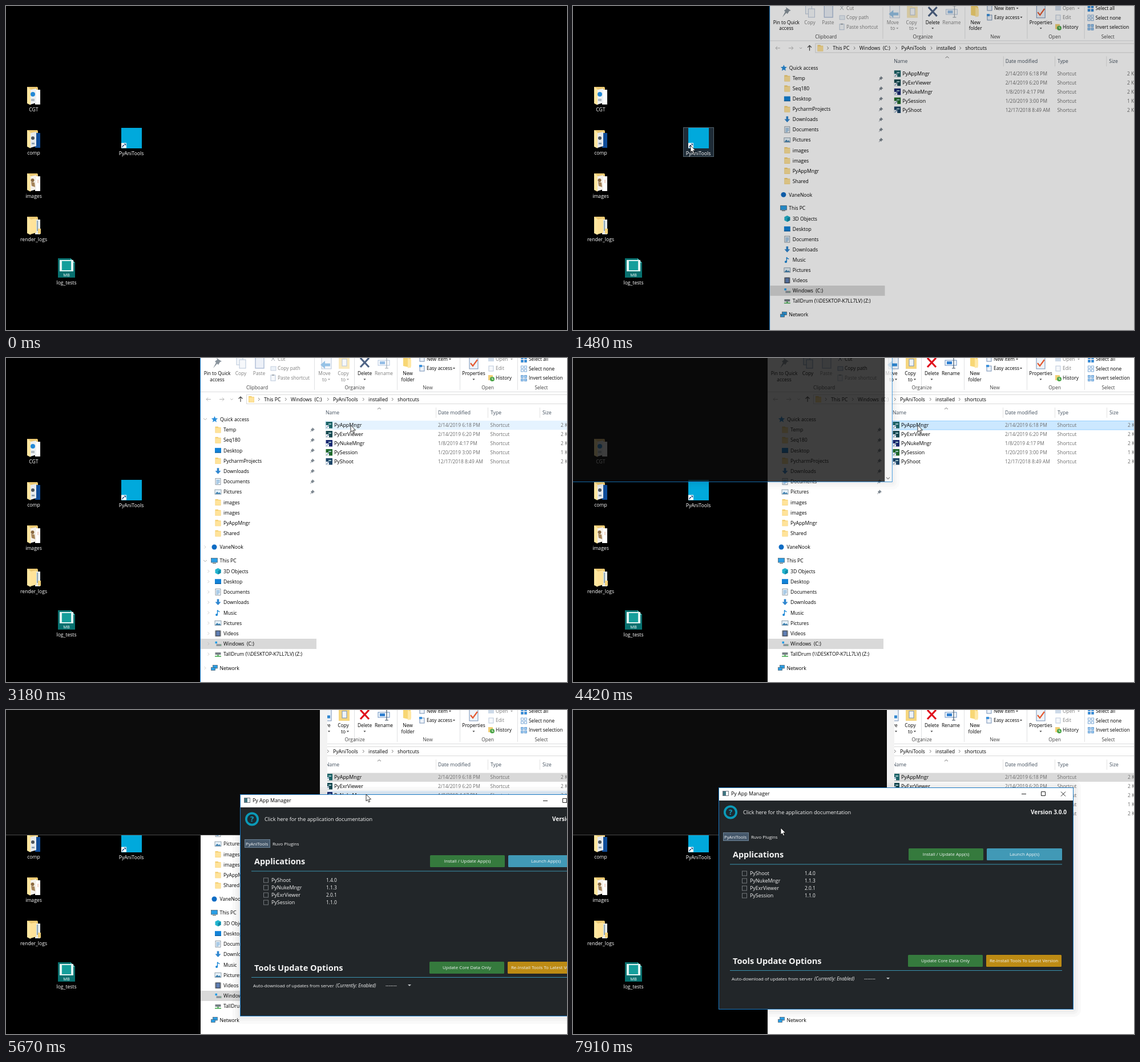
Write an HTML page that moves like this. It is 983 px wide and 569 px high and loops after 7.99 s.

```html
<!DOCTYPE html>
<html lang="en">
<head>
<meta charset="utf-8">
<title>Desktop demo</title>
<style>
html, body { margin: 0; width: 100%; height: 100%; overflow: hidden; background: #000; }
svg { display: block; width: 983px; height: 569px; font-family: "Open Sans", "Noto Sans", sans-serif; }
text { white-space: pre; }
.off { opacity: .5; }
.need { opacity: .5; }
.picked .need { opacity: 1; }
#cross { stroke: #4f6486; }
.picked #cross { stroke: #e0101c; }
</style>
</head>
<body>
<svg id="stage" viewBox="0 0 983 569"></svg>
<script>
const LOOP = 7990;

// ---- markup helpers ----
const rect = (x, y, w, h, fill, more = '') =>
  `<rect x="${x}" y="${y}" width="${w}" height="${h}" fill="${fill}" ${more}/>`;
const path = (d, fill, more = '') => `<path d="${d}" fill="${fill}" ${more}/>`;
const line = (d, color, width = 1, more = '') =>
  path(d, 'none', `stroke="${color}" stroke-width="${width}" ${more}`);
const dot = (x, y, r, fill, more = '') => `<circle cx="${x}" cy="${y}" r="${r}" fill="${fill}" ${more}/>`;
const text = (x, y, s, size = 8.6, fill = '#000', more = '') =>
  `<text x="${x}" y="${y}" font-size="${size}" fill="${fill}" ${more}>${s}</text>`;
const mid = (x, y, s, size, fill) => text(x, y, s, size, fill, 'text-anchor="middle"');
const group = (attrs, ...parts) => `<g ${attrs}>${parts.join('')}</g>`;
const move = (x, y, ...parts) => group(`transform="translate(${x} ${y})"`, ...parts);
const chevron = (x, y, color = '#666') => line(`M${x - 1} ${y - 2.5}l2.5 2.5-2.5 2.5`, color, .9);
const caret = (x, y, color = '#444') => path(`M${x - 2} ${y - 1}h4l-2 2.4z`, color);

// ---- desktop ----
const folder = (y, name, ...papers) => move(37, y,
  path('M0 1h18l1 2v26H0z', '#ecc972'), ...papers,
  path('M0 1L6 5V33L0 30z', '#ffe7a0')) + mid(48.5, y + 44.2, name, 8.6, '#fff');
const front = fill => path('M6 6l10-2v25L6 32z', fill);
const back = fill => path('M14 6h9v26H14z', fill);
const shortcut = (x, y, s) => rect(x, y, s, s, '#fff') +
  line(`M${x + s * .25} ${y + s * .85}q0-${s * .4} ${s * .35}-${s * .4}`, '#1f4f86', s / 6) +
  path(`M${x + s * .5} ${y + s * .15}h${s * .4}v${s * .4}z`, '#1f4f86');

const desktop = [
  folder(141, 'CGT', back('#fdfdfd'), front('#eef1f3'), dot(10, 14, 4, '#2389d6'), rect(7, 22, 6, 4, '#b3bcc3')),
  folder(217, 'comp', back('#0f4c98'), front('#e6eaed'), dot(10, 15, 3, '#4d555c'), rect(8, 23, 5, 3, '#8fa3b5')),
  folder(293, 'images', back('#fff'), front('#f5f1ea'), dot(9.5, 13, 3, '#8b6a42'), path('M7 16l6 1 1 8-6-2z', '#a5845a'), rect(18, 12, 2, 6, '#f2d3c4')),
  folder(369, 'render_logs', back('#e4e9ea'), rect(17, 8, 2, 18, '#8ca5b5'), front('#ffe39a'), rect(19, 22, 5, 9, '#f4d27a')),
  path('M91 443h22l8 8v26H91z', '#07706f'), path('M113 443l8 8h-8z', '#4cc0bb'),
  rect(94, 446, 24, 20, '#dff3f1'), rect(98, 448, 16, 16, '#159e9b'),
  mid(106, 475, 'MB', 7.5, '#fff'), mid(106, 489.2, 'log_tests', 8.6, '#fff'),
  rect(193.5, 213.5, 53, 51, 'rgba(110,160,200,.27)', 'id="glow" stroke="#53626c"'),
  rect(202, 214, 36, 36, '#00a9dc'), shortcut(202, 240.5, 9),
  mid(219.5, 261.5, 'PyAniTools', 8.7, '#fff')
].join('');

// ---- small icons, 12 x 12 ----
const screen = (x, y, w, h) => rect(x, y, w, h, '#2b9fe6', 'stroke="#4b5a66" stroke-width=".7"');
const icons = {
  star: path('M6 .5l1.6 3.7 4 .3-3 2.7.9 4L6 9.1l-3.5 2.1.9-4-3-2.7 4-.3z', '#2a8fdc'),
  folder: path('M1 .5h5l1 1.2h4V11.5H1z', '#f3cd6c') + rect(1.6, 2.6, 9, 8.5, '#ffe39a'),
  desk: rect(.5, 1.5, 11, 8.5, '#1283d8') + rect(.5, 9, 11, 1.2, '#0b5a9c'),
  down: path('M4.2.5h3.6v5H11L6 11 1 5.5h3.2z', '#2f86cf'),
  doc: rect(1.5, .5, 9, 11, '#f4f7fa', 'stroke="#7a8894" stroke-width=".8"') + line('M3 3.5h6M3 5.5h6M3 7.5h6M3 9.5h4', '#4f94cc', .9),
  pic: rect(.5, 2, 11, 8, '#e7f2fa', 'stroke="#7d8f9c" stroke-width=".8"') + path('M1 9.5l3.5-4 2.5 2.5 1.5-1.5 2.6 3z', '#3c7fae'),
  cloud: dot(6, 6, 4.5, '#0f6cc4'),
  pc: screen(.5, 1.5, 11, 7.5) + rect(3, 10, 6, 1, '#566'),
  cube: path('M6 .5l5 2.5v6L6 11.5 1 9V3z', '#23b5cf') + path('M6 5.5l5-2.5v6l-5 2.5z', '#0f8aa8'),
  note: line('M5 9.5V1.5q1 2.5 4 3', '#1a87d6', 1.4) + dot(3.6, 9.6, 2, '#1a87d6'),
  film: rect(1, .8, 10, 10.4, '#39404a') + rect(3, 2, 6, 8, '#5f7fb5') + line('M2 1.5v9M10 1.5v9', '#ccc', .9, 'stroke-dasharray="1 1"'),
  drive: rect(3, 6.5, 9, 3.5, '#8b9299') + rect(1, 2, 3.5, 3.5, '#1c9be8') + rect(9.5, 8, 1.5, 1, '#5ee06a'),
  share: rect(1, 3, 10, 4, '#777f86') + rect(.5, 9, 11, 1.5, '#3da648') + rect(5, 7, 2, 3, '#3da648'),
  net: screen(3.5, 1, 8, 5.5) + screen(.5, 5, 7, 5)
};
const icon = (name, x, y) => move(x, y - 6, icons[name]);

// ---- explorer ----
const two = (x, a, b) => mid(x, 30, a, 8.35) + mid(x, 40.5, b, 8.35);
const page = (x, y, w, h) => rect(x, y, w, h, '#eef3f9', 'stroke="#7590b5" stroke-width="1"');
const small = (x, y, s) => text(x, y + 3.3, s, 8.35);
const heads = [[440, 'Clipboard'], [611, 'Organize'], [739, 'New'], [844, 'Open'], [938, 'Select']];

const ribbon = [
  rect(341, 59, 642, 1, '#dcdddf'),
  ...[540, 610, 685, 795, 896].map(x => rect(x, 0, 1, 56, '#e0e1e3')),
  ...heads.map(([x, s]) => mid(x, 55.3, s, 8.45, '#444')),
  path('M369 0l9 6-3 1-3 5-2-2-7 8 5-10-2-2 4-3z', '#8a949d'),
  two(370, 'Pin to Quick', 'access'),
  group('class="need"', page(404, -3, 11, 15), page(409, 3, 11, 15), mid(411.5, 30, 'Copy', 8.35),
    line('M465 5l6-8M471 5l-6-8', '#456', 1), small(476, 2, 'Cut'),
    rect(464, 15, 9, 7, '#dbe6f2', 'stroke="#7590b5" stroke-width=".8"'), small(476, 18, 'Copy path')),
  group('class="off"', rect(437, -4, 15, 22, '#dce5f2', 'stroke="#5d7db0" stroke-width="1.4"'), mid(443.5, 30, 'Paste', 8.35),
    page(464, 30, 8, 10), rect(466, 29, 4, 2, '#456'), small(476, 35, 'Paste shortcut')),
  group('class="need"', page(553, -4, 17, 23), path('M551 12l8-7v4.5h9v5h-9v4.5z', '#2f86cf'), two(558, 'Move', 'to'), caret(566, 37.5),
    path('M583-4h8l2 3h9v20h-19z', '#f6d67e'), page(589, 2, 8, 12), two(591, 'Copy', 'to'), caret(599, 37.5),
    rect(652, 4, 20, 9, '#f2f7fc', 'stroke="#6a8fc0"'), rect(655, 6, 9, 5, '#2f7fd0'), line('M664-2h6M667-2v20M664 18h6', '#456', 1.2), mid(662, 30, 'Rename', 8.35)),
  line('M621 0l15 16M636 0l-15 16', '', 3.2, 'id="cross"'),
  mid(628.5, 30, 'Delete', 8.35), caret(628.5, 37.5),
  path('M696-4h9l4 4v17l-13-3z', '#f8d775'), path('M704 0l6 3v12l-6 3z', '#ffe8a5'), two(704, 'New', 'folder'),
  page(725, -3, 8, 9), small(737, 2, 'New item'), caret(778, 2),
  page(725, 14, 8, 9), rect(724, 12, 5, 4, '#3c91dc'), small(737, 18, 'Easy access'), caret(785, 18),
  page(812, -4, 15, 23), line('M814 9l4 5 8-11', '#e4572e', 2.2), mid(819.5, 30, 'Properties', 8.35), caret(819.5, 37.5),
  group('class="off"', rect(845, -2, 10, 8, '#9cb6d4'), small(858, 2, 'Open'), caret(886, 2), page(846, 14, 8, 9), small(858, 18, 'Edit')),
  rect(845, 30, 8, 9, '#f3d078'), dot(852, 37, 4, '#4ea64b'), line('M852 34.5v3h2', '#fff', .9), small(858, 35, 'History'),
  ...['Select all', 'Select none', 'Invert selection'].map((s, i) => {
    const y = 2 + i * 16.5, fill = ['#2d8bdb', '#fff', '#9cc9f0'][i];
    const cell = (dx, dy) => rect(902.5 + dx, y - 4.5 + dy, 4, 4, fill, 'stroke="#5a93cc" stroke-width=".8"');
    return cell(0, 0) + cell(6, 0) + cell(0, 6) + cell(6, 6) + small(916, y, s);
  })
].join('');

const crumbs = [[452, 'This PC'], [499, 'Windows  (C:)'], [573, 'PyAniTools'], [635, 'installed'], [686, 'shortcuts']];
const address = [
  line('M359 72.5h-8m3-3l-3 3 3 3', '#b5b5b5'), line('M374 72.5h8m-3-3l3 3-3 3', '#b5b5b5'),
  line('M393.5 71.5l2 2 2-2', '#999', .8), line('M411 77v-9m-3.5 3.5l3.5-3.5 3.5 3.5', '#444', 1.2),
  rect(421.5, 64.5, 570, 16, '#fff', 'stroke="#d9d9d9"'), icon('folder', 424, 72.5),
  ...crumbs.map(([x, s]) => chevron(x - 9, 72.5) + text(x, 75.8, s, 8.7))
].join('');

const quick = ['folder:Temp', 'folder:Seq180', 'desk:Desktop', 'folder:PycharmProjects', 'down:Downloads', 'doc:Documents',
  'pic:Pictures', 'folder:images', 'folder:images', 'folder:PyAppMngr', 'folder:Shared'];
const places = ['cube:3D Objects', 'desk:Desktop', 'doc:Documents', 'down:Downloads', 'note:Music', 'pic:Pictures', 'film:Videos',
  'drive:Windows  (C:)', 'share:TallDrum (\\\\DESKTOP-K7LL7LV) (Z:)'];
const quickY = i => 126 + i * 18.2, placeY = i => 374.5 + i * 18.2;
const entry = (s, x, y) => {
  const cut = s.indexOf(':');
  return icon(s.slice(0, cut), x, y) + text(x + 15.5, y + 3.2, s.slice(cut + 1));
};
const pin = y => move(537, y, path('M0-4l4 4-2 .5-1.5 2.5-1.5-1.5-3 3 2-4-1-1.5 2.5-1z', '#7d8790'));
const nav = [
  rect(341, 493, 203, 18, '#d9d9d9'),
  entry('star:Quick access', 359.5, 107.5),
  ...quick.map((s, i) => entry(s, 365.5, quickY(i)) + (i < 7 ? pin(quickY(i)) : '')),
  entry('cloud:VaneNook', 359, 332), entry('pc:This PC', 359, 356),
  ...places.map((s, i) => entry(s, 365.5, placeY(i))),
  entry('net:Network', 359, 544.5),
  group('id="twist"',
    ...[107, 356].map(y => line(`M346 ${y - 1}l3 2.5 3-2.5`, '#777', .9)),
    ...[332, 544.5].map(y => chevron(348.5, y, '#aaa')),
    ...places.map((s, i) => chevron(354.5, placeY(i), '#aaa')))
].join('');

const files = [
  ['PyAppMngr', '2/14/2019 6:18 PM', 2, '#1c6468'], ['PyExrViewer', '2/14/2019 6:20 PM', 2, '#174a52'],
  ['PyNukeMngr', '1/8/2019 4:17 PM', 2, '#1a2a72'], ['PySession', '1/20/2019 3:00 PM', 1, '#1f6a2c'],
  ['PyShoot', '12/17/2018 8:49 AM', 2, '#1d4668']
];
const list = [
  ...[[560, 'Name'], [757, 'Date modified'], [849, 'Type'], [940, 'Size']].map(([x, s]) => text(x, 99.2, s, 8.6, '#43505e')),
  ...[753, 844, 935].map(x => rect(x, 87, 1, 18, '#e3e3e3')),
  line('M651 90l3-2.5 3 2.5', '#777'),
  rect(559, 0, 430, 16, '#e5f3ff', 'id="hover"'),
  rect(559, 110.5, 430, 15.5, '#cce8ff', 'id="chosen"'),
  ...files.map(([name, date, kb, color], i) => {
    const y = 118 + i * 16, gray = '#6d6d6d';
    return rect(560.5, y - 6, 11.5, 11.5, color) + rect(565, y - 3, 5, 2, '#9fc3c8') + shortcut(560.5, y, 5.5) +
      text(575, y + 3.3, name, 8.9) + text(757, y + 3.2, date, 8.45, gray) +
      text(848.5, y + 3.2, 'Shortcut', 8.5, gray) + text(972, y + 3.2, kb + ' KB', 8.5, gray);
  })
].join('');

const explorer = rect(341, -10, 700, 600, '#fff') + ribbon + address + nav + list +
  rect(340, -10, 1, 600, '#1883d7', 'id="edge"');

// ---- console ----
const shade = (x, y, w, h) => [4, 8, 13].map(d =>
  rect(x - d, y - d, w + 2 * d, h + 2 * d, 'rgba(0,0,0,.022)', `rx="${d}"`)).join('');
const consoleWin = [
  group('class="focus"', shade(-60, -60, 623, 280)),
  rect(-60, -60, 610, 280, '#0c0c0c'), rect(550, -60, 13, 280, '#f3f3f3'),
  rect(-60, 219, 623, 1, '#4a4a4a'),
  group('class="focus"', line('M552.5 211.5l3 3 3-3', '#555', 1.1), line('M-60 219.5H563V-60', '#1883d7'))
].join('');

// ---- app window ----
const button = (x, y, w, fill, s) => rect(x, y, w, 21, fill, 'rx="1.5"') + mid(x + w / 2, y + 13.4, s, 7.95, '#f2f5f6');
const white = '#f4f4f4', teal = '#3a93b0';
const apps = [['PyShoot', '1.4.0'], ['PyNukeMngr', '1.1.3'], ['PyExrViewer', '2.0.1'], ['PySession', '1.1.0']];
const bold = 'font-weight="700"';
const appWin = [
  shade(0, 0, 622, 390),
  rect(0, 0, 622, 390, '#222629'), rect(0, 0, 622, 23, '#fff'),
  rect(7.5, 6.5, 10, 8, '#fff', 'stroke="#6f7780"'), rect(8, 7, 5, 7, '#3f7580'),
  text(22, 14.3, 'Py App Manager', 8.9),
  line('M531 11.5h8M565.5 7.5h7v7h-7zM600 7.5l8 8M608 7.5l-8 8', '#222'),
  dot(21, 43.5, 12, '#0b9ab8'), dot(21, 43.5, 8.3, '#1c2b33'),
  text(21, 48, '?', 13, '#12a5c4', bold + ' text-anchor="middle"'),
  text(43, 46.8, 'Click here for the application documentation', 9.15, white),
  text(610, 47, 'Version 3.0.0', 10, white, bold + ' text-anchor="end"'),
  rect(8.5, 79.5, 44, 14, '#45586b', 'stroke="#6c8295"'),
  text(10, 89.5, 'PyAniTools', 7.8, white), text(57, 89.5, 'Ruvo Plugins', 7.8, white),
  text(25, 123, 'Applications', 14.4, white, bold), rect(20, 134.5, 582, 1, teal),
  button(333, 107, 131, '#357a3d', 'Install / Update App(s)'), button(470, 107, 132, '#4199b6', 'Launch App(s)'),
  ...apps.map(([name, version], i) => {
    const y = 151 + i * 13;
    return rect(41.5, y - 4, 8, 8, 'none', 'stroke="#74797d"') + text(55, y + 3.2, name, 8.9, white) + text(151, y + 3.2, version, 8.3, white);
  }),
  text(25, 309.5, 'Tools Update Options', 14.6, white, bold), rect(20, 321, 582, 1, teal),
  button(332, 294, 131, '#357a3d', 'Update Core Data Only'), button(469, 294, 132, '#bd8b14', 'Re-Install Tools To Latest Version'),
  text(23, 338.5, 'Auto-download of updates from server', 7.83, white),
  text(168, 338.5, '(Currently: Enabled)', 8.1, white, 'font-style="italic"'),
  text(255, 338.5, '-------', 8.8, white), path('M294 334h6l-3 3z', '#c0c4c6'),
  rect(.5, .5, 621, 389, 'none', 'stroke="#1a78c2"')
].join('');

const pointer = path('M0 0v12l2.7-2.5 1.9 4.4 2-.9-1.9-4.2h3.8z', '#fff', 'stroke="#000" stroke-width=".8"');

const stage = document.getElementById('stage');
stage.innerHTML = desktop + group('id="explorer"', explorer) + group('id="console"', consoleWin) +
  group('id="app"', appWin) + group('id="mouse"', dot(0, 2, 9, '#f2dc1e', 'id="click"') + pointer);

// ---- timeline ----
const find = id => document.getElementById(id);
const [glow, explorerEl, edge, twist, hover, chosen, consoleEl, appEl, mouse, click] =
  ['glow', 'explorer', 'edge', 'twist', 'hover', 'chosen', 'console', 'app', 'mouse', 'click'].map(find);
const focus = stage.querySelectorAll('.focus');

// Screen refreshes: start, end, count
const ticks = [
  [0, 0, 1], [70, 530, 7], [830, 1070, 4], [1310, 1480, 3], [1540, 1540, 1], [2170, 2950, 11], [3010, 3010, 1],
  [3180, 3180, 1], [3260, 3510, 4], [3730, 4020, 5], [4190, 4190, 1], [4340, 4420, 2], [4490, 4750, 4],
  [5300, 5670, 6], [5840, 5990, 3], [6220, 6590, 6], [6680, 6900, 4], [7220, 7280, 2], [7600, 7910, 5]
].flatMap(([a, b, n]) => Array.from({ length: n }, (_, i) => Math.round(a + (b - a) * i / Math.max(1, n - 1))));
const snap = t => ticks.reduce((last, tick) => tick <= t ? tick : last, 0);

// Value between keys of [time, ...values]
const smooth = u => u * u * (3 - 2 * u), linear = u => u;
function at(t, keys, ease = smooth) {
  const i = keys.findIndex(k => k[0] > t);
  if (i < 0) return keys[keys.length - 1].slice(1);
  if (i === 0) return keys[0].slice(1);
  const a = keys[i - 1], b = keys[i], e = ease((t - a[0]) / (b[0] - a[0]));
  return a.slice(1).map((v, j) => v + (b[j + 1] - v) * e);
}
const within = (t, ...spans) => spans.some(([a, b]) => t >= a && t < b);
const show = (el, alpha) => el.setAttribute('opacity', alpha);
const zoom = (s, cx, cy) => `translate(${cx} ${cy}) scale(${s}) translate(${-cx} ${-cy})`;

const mouseKeys = [[70, 777, 502], [530, 206, 245], [2090, 206, 245], [2950, 604, 118], [4490, 604, 118],
  [4750, 583, 235], [5226, 583, 235], [5670, 631, 148], [5765, 631, 148], [5990, 619, 161]];
const dragKeys = [[6220, 410, 148], [6590, 319, 132], [6750, 281, 128], [6900, 255, 136]];
const leaveKeys = [[7520, 464, 149], [7910, 364, 207]];

function draw(time) {
  const t = snap(time);
  const win = at(t, dragKeys, linear);
  const [mx, my] = t < 6220 ? at(t, mouseKeys) : t < 7520 ? [win[0] + 209, win[1] + 13] : at(t, leaveKeys);

  mouse.setAttribute('transform', `translate(${mx} ${my})`);
  show(mouse, t < 70 ? 0 : 1);
  const pressed = within(t, [830, 905], [985, 1070], [3730, 3870], [3940, 4190], [6220, 7220]);
  show(click, pressed ? .85 : t === 7220 ? .4 : 0);
  show(glow, t < 2170 && mx > 192 && mx < 248 && my < 266 ? 1 : 0);

  const [alpha, size] = at(t, [[1230, 0, .94], [1310, .15, .96], [1395, .5, .98], [1480, .85, .992], [1540, 1, 1]]);
  show(explorerEl, alpha);
  explorerEl.setAttribute('transform', zoom(size, 849, 250));
  show(twist, at(t, [[2330, 0], [2500, 1], [2950, 1], [3510, 0]])[0]);

  const row = Math.floor((my - 110) / 16), free = t < 4570 || (my <= 148 && t < 6220);
  hover.setAttribute('y', 110 + row * 16);
  show(hover, mx > 559 && row >= 0 && row < 5 && free ? 1 : 0);
  const picked = t >= 3730, active = t < 4490;
  explorerEl.classList.toggle('picked', picked);
  show(edge, t < 4340 ? 1 : 0);
  show(chosen, picked ? 1 : 0);
  chosen.setAttribute('fill', active ? '#cce8ff' : '#d9d9d9');
  chosen.setAttribute('stroke', active ? '#99d1ff' : 'none');

  const [dark, grow] = at(t, [[4260, 0, .95], [4340, .35, .97], [4420, .79, .991], [4490, 1, 1]]);
  show(consoleEl, dark);
  consoleEl.setAttribute('transform', zoom(grow, 160, 0));
  focus.forEach(el => show(el, t < 4660 ? 1 : 0));

  const [seen, scale] = at(t, [[4490, 0, .94], [4577, .35, .965], [4663, .83, .99], [4750, 1, 1]]);
  show(appEl, seen);
  appEl.setAttribute('transform', `translate(${win[0]} ${win[1]}) ${zoom(scale, 311, 195)}`);
}

const begin = performance.now();
function tick() {
  draw((performance.now() - begin) % LOOP);
  requestAnimationFrame(tick);
}
tick();
</script>
</body>
</html>
```
